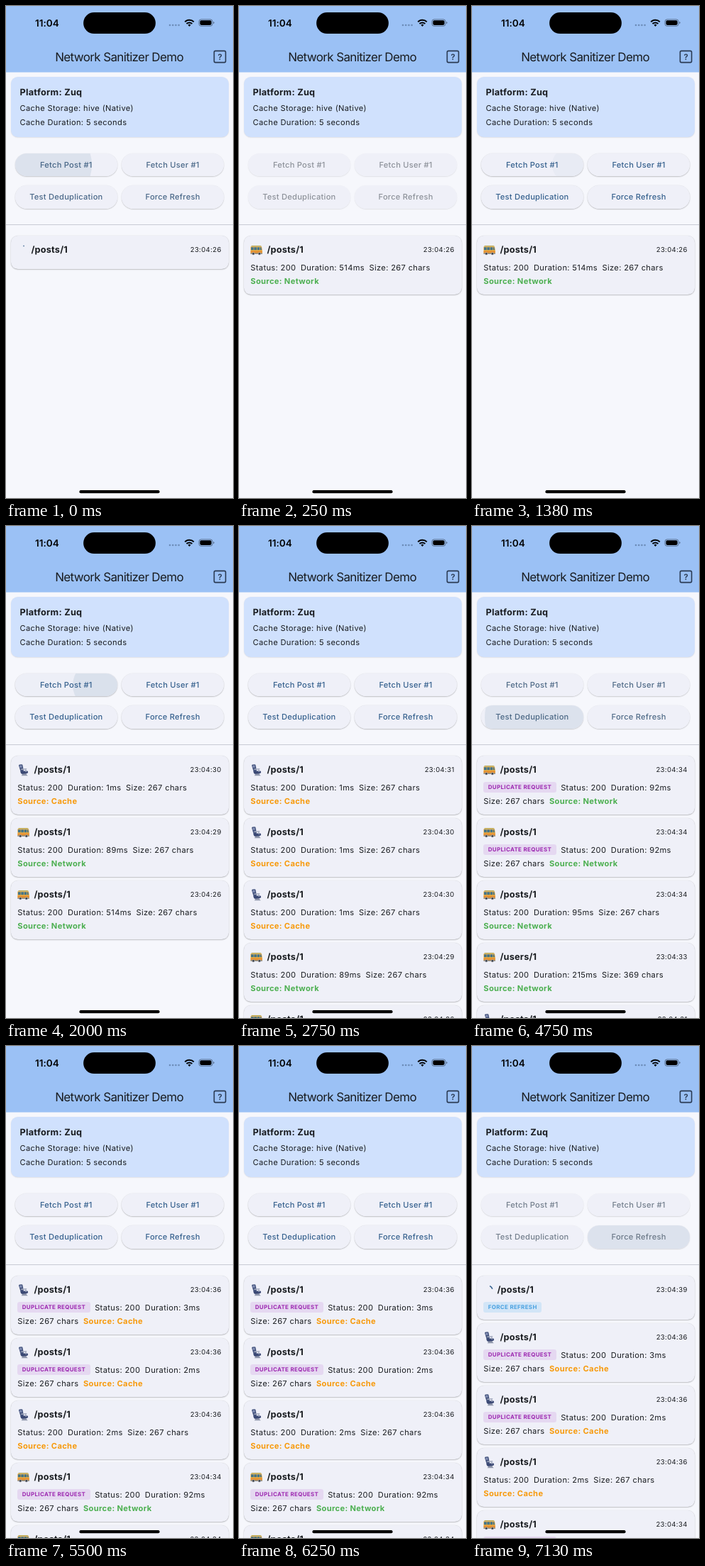
These frames come from a looping animation (320x694 px, 7260 ms). An HTML page:

```html
<!DOCTYPE html>
<html lang="en">
<head>
<meta charset="utf-8">
<title>Network Sanitizer Demo</title>
<style>
html, body { margin: 0; width: 100%; height: 100%; overflow: hidden; }
body { position: relative; background: #f6f7fc; color: #191c20; font: 11.1px/16.3px Inter, Roboto, sans-serif; letter-spacing: .36px; text-rendering: geometricPrecision; }
.layer { position: absolute; left: 0; top: 0; }
#info { position: absolute; left: 6.5px; top: 100.1px; width: 307px; height: 84.7px; border-radius: 9.8px; background: #d0e1fd; box-shadow: 0 .5px 1.5px #0002; }
#info p { position: absolute; left: 13px; margin: 0; white-space: nowrap; }
#info .head { font-size: 12.7px; font-weight: 700; letter-spacing: .28px; }
.button, .shade { position: absolute; width: 143.7px; height: 32.6px; border-radius: 16.3px; }
.button { overflow: hidden; background: #eff0f8; }
.shade { box-shadow: 0 .8px 1.6px #0004, 0 0 1px #0002; }
.ripple { position: absolute; border-radius: 50%; background: #36618e; }
.label { position: absolute; inset: 0; text-align: center; line-height: 32.6px; font-weight: 500; letter-spacing: .25px; }
#rule { position: absolute; top: 308px; width: 100%; height: 1px; background: #c8cbd4; }
#list { position: absolute; left: 6.5px; top: 324px; width: 307px; }
.card { box-sizing: border-box; height: 83px; margin-bottom: 5px; padding: 9.8px 9.8px 0; border-radius: 9.8px; background: #eff0f8; box-shadow: 0 .8px 1.6px #0004, 0 0 1px #0002; }
.card.busy { height: 47px; }
.card.busy.tagged { height: 62px; }
.top { display: flex; align-items: center; height: 22px; margin-bottom: 5px; }
.top svg { flex: none; margin-right: 6.2px; }
.path { font-size: 12.7px; font-weight: 700; letter-spacing: .2px; }
.time { margin-left: auto; font-size: 9.5px; letter-spacing: .38px; }
.facts { display: flex; flex-wrap: wrap; gap: 3.25px 6.5px; white-space: nowrap; }
.facts b { font-weight: 700; }
.Network { color: #4caf50; }
.Cache { color: #f79a0c; }
.tag { height: 15px; padding: 0 6.5px; border-radius: 3.3px; font-size: 7.9px; font-weight: 700; line-height: 15px; letter-spacing: .37px; }
.DUPLICATE { background: #e5d8f1; color: #9c27b0; }
.FORCE { background: #d2e5f7; color: #48a0e0; }
</style>
</head>
<body>
<svg class="layer" width="320" height="94">
  <path fill="#9bc1f5" d="M0 0H320V93.6H0z"/>
  <rect x="109.1" y="9" width="101.8" height="30.1" rx="15"/>
  <text x="41" y="28.8" font-size="13.5" font-weight="600" letter-spacing=".05">11:04</text>
  <g fill="#6c8cb8"><circle cx="231" cy="27" r="1.3"/><circle cx="235.2" cy="27" r="1.3"/><circle cx="239.4" cy="27" r="1.3"/><circle cx="243.6" cy="27" r="1.3"/></g>
  <g fill="none" stroke="#000" stroke-width="2"><path d="M252.2 22.4a9 9 0 0 1 12.6 0"/><path d="M254.6 25.1a5.6 5.6 0 0 1 7.8 0"/></g>
  <path d="M258.5 29l-2-2.2a2.9 2.9 0 0 1 4 0z"/>
  <rect x="272" y="18.9" width="19" height="9.4" rx="3" fill="none" stroke="#0007" stroke-width=".9"/>
  <rect x="273.4" y="20.3" width="16.2" height="6.6" rx="1.8"/>
  <path fill="#0007" d="M292.3 22v3.2q1.3-.4 1.3-1.6t-1.3-1.6"/>
  <text x="159.6" y="77.5" font-size="17" text-anchor="middle" letter-spacing="-.64" fill="#191c20">Network Sanitizer Demo</text>
  <rect x="293.4" y="63.4" width="16.2" height="16.2" rx="1.8" fill="none" stroke="#2a3a52" stroke-width="1.6"/>
  <text x="301.5" y="75.8" font-size="11.5" font-weight="600" text-anchor="middle" letter-spacing="0" fill="#2a3a52">?</text>
</svg>
<div id="info">
  <p class="head" style="top:15px">Platform: Zuq</p>
  <p style="top:36px">Cache Storage: hive (Native)</p>
  <p style="top:55.5px">Cache Duration: 5 seconds</p>
</div>
<div id="buttons"></div>
<div id="rule"></div>
<div id="list"></div>
<svg class="layer" width="320" height="694"><rect x="103.4" y="683.1" width="113.2" height="4.1" rx="2.05"/></svg>

<script>
const LOOP = 7260, STEP = 125, LAST = 57;
const POST = 0, USER = 1, DEDUP = 2, FORCE = 3;
const names = ['Fetch Post #1', 'Fetch User #1', 'Test Deduplication', 'Force Refresh'];

// button, x inside it, finger down, finger up (ms)
const taps = [
  [POST, 30, -200, -40], [POST, 125, 1360, 1440], [POST, 125, 1660, 1815],
  [POST, 125, 1900, 2060], [POST, 125, 2330, 2480], [USER, 40, 3340, 3560],
  [DEDUP, 94, 4400, 4680], [DEDUP, 94, 5120, 5310], [FORCE, 72, 6700, 7010]
];

const call = (start, wait, sec, ms, source, tag = '', path = '/posts/1', size = 267) =>
  ({ start, done: start + wait, sec, ms, source, tag, path, size });
const DUP = 'DUPLICATE REQUEST';

// oldest first
const calls = [
  call(-40, 265, 26, 514, 'Network'),
  call(1440, 46, 29, 89, 'Network'),
  call(1815, 1, 30, 1, 'Cache'),
  call(2060, 1, 30, 1, 'Cache'),
  call(2480, 1, 31, 1, 'Cache'),
  call(3560, 115, 33, 215, 'Network', '', '/users/1', 369),
  call(4680, 60, 34, 95, 'Network'),
  call(4680, 60, 34, 92, 'Network', DUP),
  call(4680, 60, 34, 92, 'Network', DUP),
  call(5310, 2, 36, 2, 'Cache'),
  call(5310, 2, 36, 2, 'Cache', DUP),
  call(5310, 2, 36, 3, 'Cache', DUP),
  call(7010, 400, 39, 0, 'Network', 'FORCE REFRESH')
];

const icons = {
  Network: `<svg width="17" height="17" viewBox="0 0 17 17">
    <path fill="#b5a650" d="M.8 3.4q.1-1.5 1.6-1.5h11.8q1.4 0 1.7 1.5z"/>
    <path fill="#f0ab3c" d="M.4 3.4h15.6l.8 5.2v4.6H.4z"/>
    <path fill="#41748a" d="M1 4.2h3.6v4H1zM5.3 4.2h3.6v4H5.3zM9.6 4.2H13v4H9.6zM13.7 4.2h1.6l.7 4h-2.3z"/>
    <path fill="#d9762b" d="M.4 10.2h16.4v1.1H.4z"/>
    <path fill="#6b6f78" d="M.4 12.5h16.4v1.2H.4z"/>
    <g fill="#30343c" stroke="#b9bdc6" stroke-width=".7"><circle cx="4.2" cy="13.4" r="1.7"/><circle cx="12.8" cy="13.4" r="1.7"/></g></svg>`,
  Cache: `<svg width="17" height="17" viewBox="0 0 17 17">
    <path fill="#8f96ab" d="M6.4 13h6.2l.6 1.8 1.6 1.4H5.6l1.2-1.4z"/>
    <path fill="#46557f" d="M2 1.9Q1.8.6 3.2.5L6 .3q1.3 0 1.5 1.3l1.5 7.8-4.2 1.9z"/>
    <path fill="#8793b8" d="M3.1 1.9L6 1.6l.6 3-2.9.5z"/>
    <path fill="#3a4874" d="M4.4 10.1l8.4-.9q2.3 0 2.3 1.8t-1.9 2.1l-6.5.6q-1.7 0-2-1.6z"/>
    <path fill="none" stroke="#a4abbf" stroke-width="1.5" stroke-linecap="round" d="M5.8 7.3l6.8-.6M11.6 7l.6 3.4"/></svg>`
};

const $ = id => document.getElementById(id);
const clamp = v => Math.min(1, Math.max(0, v));
const mix = (a, b, p) => a.map((v, i) => v + (b[i] - v) * p);

function add(parent, className, text = '') {
  const el = document.createElement('div');
  el.className = className;
  el.textContent = text;
  return parent.appendChild(el);
}

const buttons = names.map((name, i) => {
  const shade = add($('buttons'), 'shade');
  const box = add($('buttons'), 'button');
  for (const el of [shade, box]) {
    el.style.left = 13 + i % 2 * 150.2 + 'px';
    el.style.top = (i < 2 ? 207.8 : 253.4) + 'px';
  }
  return { shade, box };
});
const ripples = taps.map(tap => add(buttons[tap[0]].box, 'ripple'));
buttons.forEach((b, i) => b.label = add(b.box, 'label', names[i]));

// grows slowly while held, fast after release, and drifts to the button's centre
function drawRipple(el, [, x, down, up], t) {
  const held = clamp((Math.min(t, up) - down) / 520);
  const p = held + (1 - held) * clamp((t - up) / 115);
  const r = 22 + 60 * p;
  el.style.width = el.style.height = 2 * r + 'px';
  el.style.left = x + (72 - x) * p - r + 'px';
  el.style.top = 16.3 - r + 'px';
  el.style.opacity = .1 * clamp((t - down) / 40) * (1 - clamp((t - up - 115) / 77));
}

function spinner(age) {
  const length = Math.max(12, age * .6 - 18);
  return `<svg width="13" height="13" style="overflow:visible"><circle cx="6.5" cy="6.5" r="6.5" fill="none"
    stroke="#36618e" stroke-width="1.6" pathLength="360" stroke-dasharray="${length} 360"
    transform="rotate(${age * .08 - 76} 6.5 6.5)"/></svg>`;
}

function card(c, t) {
  const busy = t < c.done;
  const tag = c.tag && `<span class="tag ${c.tag.split(' ')[0]}">${c.tag}</span>`;
  const facts = busy ? '' : `<span>Status: 200</span><span>Duration: ${c.ms}ms</span>
    <span>Size: ${c.size} chars</span><b class="${c.source}">Source: ${c.source}</b>`;
  return `<div class="card ${busy ? 'busy' : ''} ${tag ? 'tagged' : ''}">
    <div class="top">${busy ? spinner(t - c.start) : icons[c.source]}
    <span class="path">${c.path}</span><span class="time">23:04:${c.sec}</span></div>
    <div class="facts">${tag}${facts}</div></div>`;
}

// how far the buttons have faded to their disabled look
const disabled = t => Math.max(...calls.map(c =>
  clamp((Math.min(t, c.done) - c.start) / 180) - clamp((t - c.done) / 180)), 0);

function draw(t) {
  const off = disabled(t);
  for (const b of buttons) {
    b.label.style.color = `rgba(${mix([54, 97, 142, 1], [25, 28, 32, .38], off)})`;
    b.shade.style.opacity = 1 - .7 * off;
  }
  taps.forEach((tap, i) => drawRipple(ripples[i], tap, t));
  $('list').innerHTML = calls.filter(c => c.start <= t).reverse().map(c => card(c, t)).join('');
}

const begin = performance.now();
let shown = -1;
function tick() {
  const now = Math.max(0, performance.now() - begin) % LOOP;
  const step = Math.min(LAST, Math.floor(now / STEP));
  if (step !== shown) draw((shown = step) * STEP);
  requestAnimationFrame(tick);
}
tick();
</script>
</body>
</html>
```
